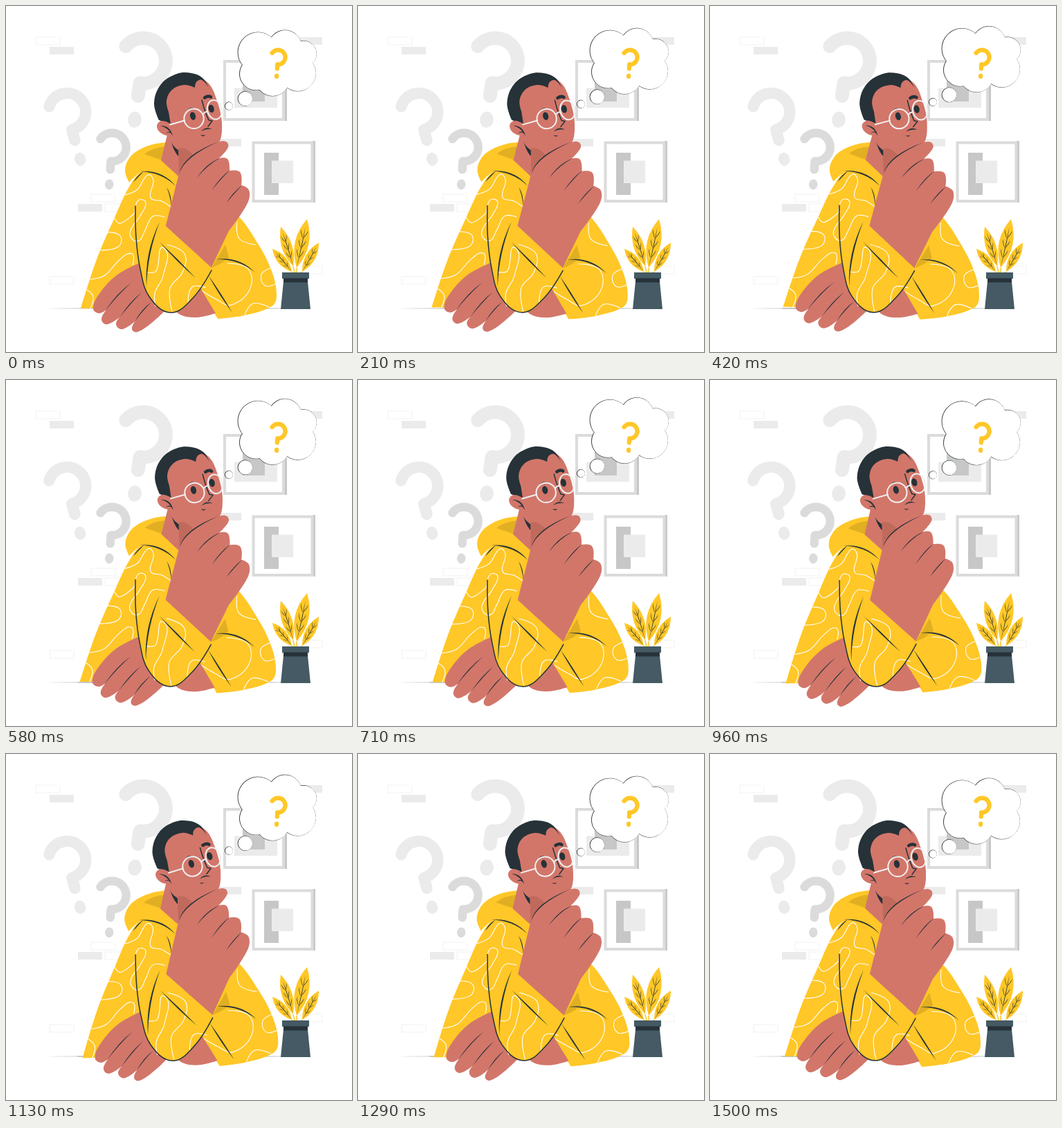
An HTML page that plays this animation: 500x500 px, repeating every 1540 ms.

```html
<!DOCTYPE html>
<html lang="en">
<head>
<meta charset="utf-8">
<title>Thinking</title>
<style>
html, body { margin: 0; width: 100%; height: 100%; overflow: hidden; background: #fff; }
svg { display: block; width: 100%; height: 100%; }
.line, .wave, .outline { fill: none; stroke-linecap: round; stroke-linejoin: round; }
.skin { fill: #d2766a; }
.yellow { fill: #ffc727; }
.shade { fill: #e0af22; }
.dark { fill: #263238; }
.wave { stroke: #fff; stroke-width: 1.1; }
.outline { stroke: #263238; stroke-width: 1.5; }
.hollow { fill: none; stroke: #ebebeb; stroke-width: .7; stroke-dasharray: 31 3 40 2; }
</style>
</head>
<body>
<svg viewBox="0 0 500 500">
  <defs>
    <path id="brick" d="M0 0h35v11h-35z"/>
    <g id="ask">
      <path class="line" stroke="currentColor" stroke-width="23" d="M-32 -20A38 38 0 1 1 0 38V60"/>
      <ellipse cy="100" rx="11.500" ry="13.500" fill="currentColor"/>
    </g>
  </defs>

  <!-- wall -->
  <g class="hollow">
    <use href="#brick" x="43" y="45"/><use href="#brick" x="123" y="272"/><use href="#brick" x="143" y="286"/>
    <use href="#brick" x="63" y="391"/><use href="#brick" x="422" y="376"/>
  </g>
  <g fill="#ebebeb">
    <use href="#brick" x="63" y="59"/><use href="#brick" x="104" y="286"/>
    <use href="#brick" x="422" y="45"/><use href="#brick" x="305" y="192"/>
  </g>
  <use href="#ask" color="#ebebeb" transform="translate(198 79) rotate(8) scale(.86)"/>
  <use href="#ask" color="#ebebeb" transform="translate(88 153) rotate(-15.600) scale(.71)"/>
  <use href="#ask" color="#dbdbdb" transform="translate(153 204) rotate(4) scale(.54)"/>
  <path fill="#c7c7c7" d="M401 78h5v88h-5zM443 195h4v89h-4z"/>
  <path fill="#fff" stroke="#dbdbdb" stroke-width="4" d="M316 80h85v84h-85zM357.500 197.500h85v84.500h-85z"/>
  <path fill="#ebebeb" d="M330 118.500h62v28.500h-62z"/>
  <path fill="#c7c7c7" d="M342 88h32v50h-32zM373 212h21v61h-21z"/>
  <path fill="#ebebeb" d="M384 223.500h31v32.500h-31z"/>
  <path class="dark" data-ink="52 437 250 437 445 437 .9"/>

  <!-- plant -->
  <g id="leaves"></g>
  <path fill="#455a64" d="M399 385h39v9h-39zM401 398h35l4 40h-43z"/>
  <path class="dark" d="M401 393.500h35v6h-35z"/>

  <!-- thinker -->
  <g id="thinker">
    <path class="yellow" data-curve="108,437! 130,369 156,308 180,258 200,238 245,240 330,298 365,345 385,386 391,420 384,434 345,447 306,452! 280,408! 200,420! 127,437!"/>
    <g class="wave">
      <path data-curve="134,353 162,348 165,332 146,327"/>
      <path data-curve="157,307 165,314 186,299"/>
      <path data-curve="122,395 143,389 165,366 182,358 183,374"/>
      <path data-curve="117,410 126,420 122,437"/>
      <path data-curve="334,312 337,336 361,345"/>
      <path data-curve="320,372 350,380 352,410 325,432 304,424 276,407"/>
      <path data-curve="382,379 369,388 374,404 389,402"/>
      <path data-curve="345,446 357,430 380,435"/>
    </g>
    <path class="skin" data-curve="194,371! 160,389 134,417 126,437 134,444 145,439! 138,453 146,460 165,449! 159,460 168,467 187,455! 182,467 190,471 214,455 240,430! 250,445 275,450 303,444! 280,406!"/>
    <path class="dark" data-ink="181 400 161 416 143 441 1.3; 196 414 180 428 164 450 1.3; 210 428 197 439 186 456 1.3"/>

    <path class="yellow" data-curve="190,246! 187,320 192,370 206,418 240,443 272,420 300,376! 232,317! 245,250!"/>
    <g class="wave">
      <path data-curve="172,273 190,265 205,244 213,252 209,277 225,282 239,291"/>
      <path data-curve="186,299 191,281 202,284 194,303 179,328 190,340 201,324 212,304 229,305"/>
      <path data-curve="204,385 217,383 228,350 227,390 215,415 216,434"/>
      <path data-curve="233,345 258,358 255,385 237,408 240,441"/>
      <path data-curve="263,428 269,406 288,407"/>
    </g>
    <path class="outline" data-curve="187,289 188,335 194,380 207,420 238,443 270,422 297,382"/>
    <path class="shade" d="M297 378L317 345L322 363Q312 373 297 378Z"/>
    <path class="dark" data-ink="222 312 202 358 203 406 2.2; 222 341 248 368 274 393 2; 293 390 309 416 327 443 2; 303 366 336 363 360 385 2"/>

    <path class="yellow" data-curve="178,255! 172,238 178,220 192,208 212,200 232,197! 243,205! 262,235 246,263! 222,243 198,239"/>
    <path class="shade" d="M200 214Q212 204 233 203L226 223Z"/>
    <path class="dark" data-ink="193 239 225 238 245 260 2; 199 239 190 246 184 255 1.5; 232 262 238 272 239 289 1.2"/>

    <path class="skin" d="M234 182L224 223L250 247L275 215Z"/>
    <path class="dark" d="M238 193Q252 212 276 215L270 221L248 216Q241 207 238 193Z"/>
    <path class="skin" data-curve="230,125! 250,104 287,107 306,140 312,180 303,203 268,216 246,206 236,190 232,160!"/>
    <path class="dark" data-curve="238,171! 221,165! 214,140 224,113 247,98 268,97 284,104 293,118! 283,107 275,110 273,118! 258,114 240,121 232,137 235,153!"/>
    <path class="skin" data-curve="239,171! 225,166 218,174 226,185 241,188!"/>
    <path class="dark" data-ink="223 173 236 174 241 188 2; 230 184 237 180 239 185 1.2; 261 153 266 146 274 149 1.8; 282 181 289 175 298 178 1.8; 281 186 285 189 288 186 1.4"/>
    <path class="outline" d="M283 136Q287 152 293 165L298 166L292 174"/>
    <path class="line" stroke="#263238" stroke-width="4.500" d="M287 132.500Q292 129 296 131.500"/>
    <g class="dark">
      <ellipse cx="270" cy="159" rx="4" ry="5.800" transform="rotate(-14 270 159)"/>
      <ellipse cx="296.500" cy="148.500" rx="4" ry="5.800" transform="rotate(-14 296 148)"/>
    </g>
    <g class="line" stroke="#f0f0f0" stroke-width="2">
      <circle cx="271.500" cy="162.800" r="14.200"/>
      <ellipse cx="301.500" cy="150" rx="10.500" ry="14" transform="rotate(-14 301 150)"/>
      <path d="M237 171.500L258 165.500M285 156Q288 152 291 153"/>
    </g>

    <path fill="#c06a5c" d="M249 206Q260 202 272 217L250 247Z"/>
    <path class="skin" data-curve="249,246! 262,222 285,208 306,197 318,196 321,204 308,220! 320,221 323,238! 338,240 340,259! 351,266 349,285 322,325! 297,378! 231,318!"/>
    <path class="dark" data-ink="251 241 257 217 307 196 1.6; 309 220 291 228 276 248 1.2; 324 237 311 247 297 267 1.2; 341 259 329 270 318 285 1.2"/>
  </g>

  <!-- thought bubble: stroked circles under a slightly shifted white copy -->
  <g id="bubble">
    <g id="puffs">
      <circle cx="364" cy="67" r="29"/><circle cx="403" cy="59" r="24"/>
      <circle cx="430" cy="69" r="18.500"/><circle cx="421.500" cy="97" r="26"/>
      <circle cx="385" cy="106" r="24"/><circle cx="361" cy="98" r="23.500"/>
      <circle cx="395" cy="80" r="25"/>
      <circle cx="345.500" cy="134" r="10.400"/><circle cx="322" cy="144.500" r="5.600"/>
    </g>
  </g>
  <use href="#ask" color="#ffc727" transform="translate(393 74) rotate(4) scale(.275)"/>
</svg>
<script>
const LOOP = 1540, CYCLE = 1500;
const $ = id => document.getElementById(id);

// Pen stroke that swells in the middle
const ink = (x1, y1, cx, cy, x2, y2, w) => {
  const d = Math.hypot(x2 - x1, y2 - y1), nx = (y1 - y2) / d * w, ny = (x2 - x1) / d * w;
  return `M${x1} ${y1}Q${cx + nx} ${cy + ny} ${x2} ${y2}Q${cx - nx} ${cy - ny} ${x1} ${y1}Z`;
};

// Smooth curve through "x,y" points; "!" marks a corner
function curve(text, closed) {
  const pts = text.split(' ').map(p => ({ sharp: p.endsWith('!'), xy: p.split(',').map(parseFloat) }));
  const n = pts.length, at = i => pts[(i + n) % n];
  const handle = (i, reach) => {
    const { sharp, xy: [x, y] } = at(i);
    if (sharp || !closed && (i === 0 || i === n - 1)) return [x, y];
    const [ax, ay] = at(i - 1).xy, [bx, by] = at(i + 1).xy, k = reach / Math.hypot(bx - ax, by - ay);
    return [x + (bx - ax) * k, y + (by - ay) * k];
  };
  let path = 'M' + pts[0].xy;
  for (let i = 0; i < n - !closed; i++) {
    const [x, y] = at(i).xy, [u, v] = at(i + 1).xy, reach = Math.hypot(u - x, v - y) * .36;
    path += `C${handle(i, reach)} ${handle(i + 1, -reach)} ${u} ${v}`;
  }
  return path;
}

function leaf(x, y, tipX, tipY, w) {
  const dx = tipX - x, dy = tipY - y, d = Math.hypot(dx, dy);
  const point = (t, side) => [x + dx * t - dy / d * side, y + dy * t + dx / d * side];
  let veins = ink(x, y, ...point(.5, 1), ...point(.85, 0), .9);
  for (const t of [.2, .4, .6])
    for (const side of [-1, 1])
      veins += ink(...point(t, 0), ...point(t + .08, side * w * .2), ...point(t + .18, side * w * .28), .7);
  return `<path stroke="#ffc727" stroke-width="1.5" d="M${x} ${y}L${(x + 420) / 2} 388"/>
    <path class="yellow" d="${ink(x, y, ...point(.5, 0), tipX, tipY, w)}"/><path class="dark" d="${veins}"/>`;
}

for (const p of document.querySelectorAll('[data-curve]'))
  p.setAttribute('d', curve(p.dataset.curve, !p.closest('.wave, .outline')));
for (const p of document.querySelectorAll('[data-ink]'))
  p.setAttribute('d', p.dataset.ink.split(';').map(s => ink(...s.trim().split(' ').map(Number))).join(''));
$('leaves').innerHTML = leaf(420, 378, 435, 308, 20) + leaf(415, 376, 397, 319, 15)
  + leaf(413, 384, 385, 351, 13) + leaf(428, 384, 452, 342, 14);

const cover = $('puffs').cloneNode(true);
cover.removeAttribute('id');
cover.setAttribute('fill', '#fff');
cover.setAttribute('transform', 'translate(.4 .1)');
$('puffs').setAttribute('stroke', '#263238');
$('puffs').setAttribute('stroke-width', .9);
$('bubble').append(cover);

function draw(now) {
  const p = Math.min(now % LOOP / CYCLE, 1);
  const angle = p < .25 ? 4 * p : p < .75 ? 2 - 4 * p : 4 * p - 4;
  const lift = 10 * (1 - Math.abs(2 * p - 1));
  $('thinker').setAttribute('transform', `rotate(${angle} 250 284)`);
  $('bubble').setAttribute('transform', `translate(0 ${-lift})`);
  requestAnimationFrame(draw);
}
draw(performance.now());
</script>
</body>
</html>
```
